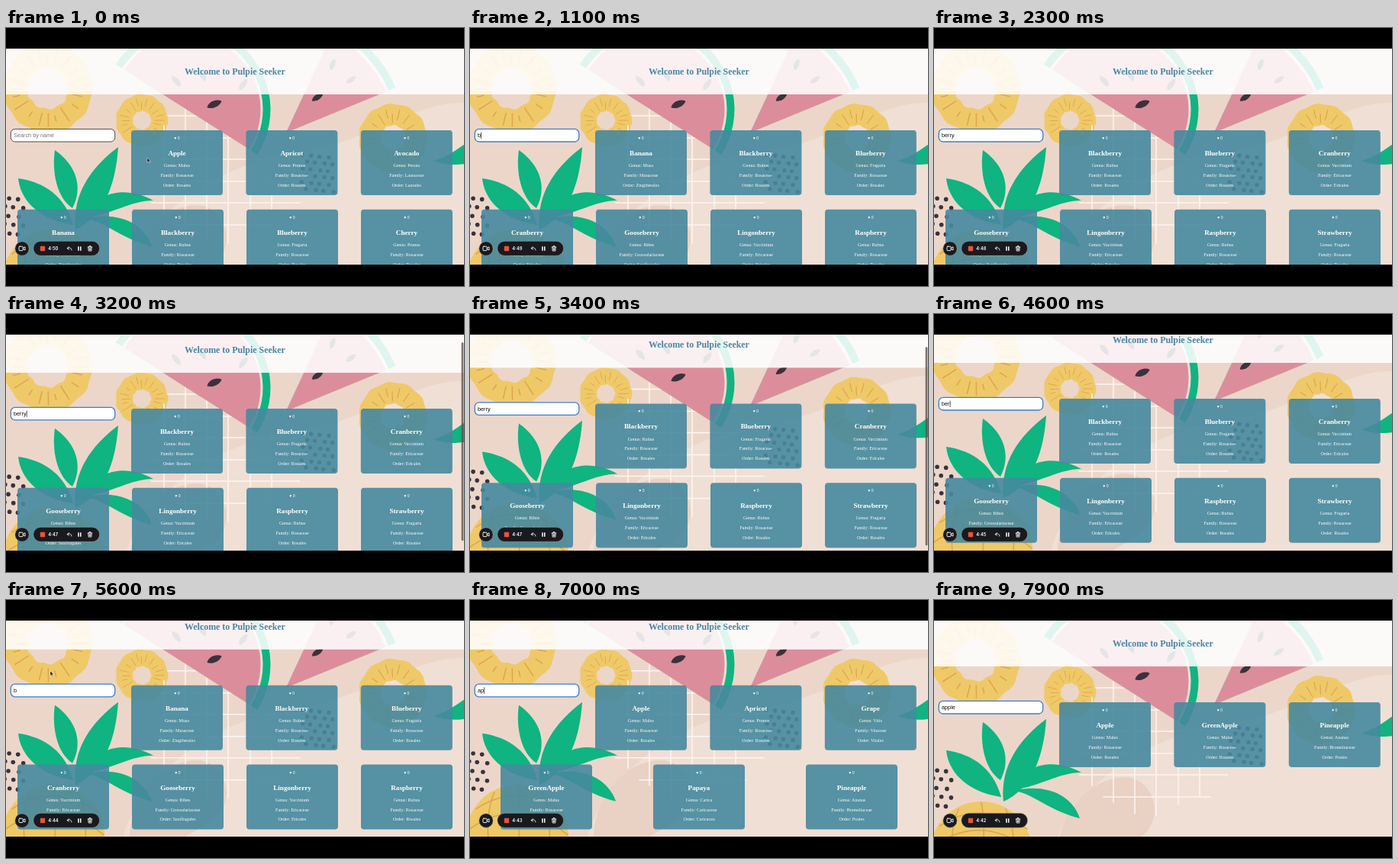
These frames come from a looping animation (600 px wide and 338 px high, 8000 ms). An HTML page:

```html
<!DOCTYPE html>
<html lang="en">
<head>
<meta charset="utf-8">
<title>Fruit search</title>
<style>
html, body { margin: 0; width: 100%; height: 100%; overflow: hidden; background: #000; }
svg { display: block; width: 600px; height: 338px; }
.serif { font-family: "Liberation Serif", "Times New Roman", serif; text-anchor: middle; }
.sans { font-family: "Liberation Sans", Arial, "DejaVu Sans", sans-serif; }
.title { font-size: 11.9px; font-weight: bold; fill: #4a86a0; }
.name { font-size: 9.1px; font-weight: bold; fill: #fff; }
.fact { font-size: 6.05px; fill: #fff; }
.likes { font-size: 5.2px; fill: #fff; text-anchor: middle; }
.input { font-size: 7.3px; }
.clock { font: 600 5.8px Inter, "Noto Sans", sans-serif; fill: #fff; }
</style>
</head>
<body>
<svg viewBox="0 0 600 338">
  <defs>
    <clipPath id="view"><rect y="27" width="600" height="283"/></clipPath>
  </defs>
  <g clip-path="url(#view)">
    <rect y="27" width="600" height="283" fill="#ecd6ca"/>
    <g id="page">
      <g id="art"></g>
      <rect y="27" width="600" height="60" fill="#fff" fill-opacity=".87"/>
      <text class="serif title" x="300" y="61">Welcome to Pulpie Seeker</text>
      <rect id="box" x="6.3" y="132.4" width="136.4" height="16.6" rx="5.5" fill="#fff"/>
      <text id="query" class="sans input" x="10" y="143.3"></text>
      <rect id="caret" y="136.5" width=".7" height="8.5" fill="#111"/>
      <g id="cards"></g>
    </g>
    <rect id="thumb" x="596.6" width="2.8" height="260" rx="1.4" fill="#5d514d" fill-opacity=".8"/>
    <g id="recorder">
      <g fill="#191a1e" stroke="#a9a39f" stroke-width=".5">
        <circle cx="21" cy="289" r="9.2"/>
        <rect x="35.8" y="279.3" width="86.8" height="19" rx="9.5"/>
      </g>
      <g fill="none" stroke="#fff" stroke-width=".9" stroke-linejoin="round" stroke-linecap="round">
        <rect x="17" y="286.2" width="5.2" height="5.4" rx="1"/>
        <path d="M22.3 288.3L25 286.8V291L22.3 289.6"/>
        <path d="M82.2 286.6L80.2 288.6L82.4 290.2M80.4 288.6C83 287 85.5 287.8 86 291"/>
        <path d="M107.2 287H112.8M109 286.8V285.6H111V286.8M107.8 287.4L108.2 292H111.8L112.2 287.4M109.3 288.6V290.6M110.7 288.6V290.6"/>
      </g>
      <rect x="44.8" y="285.8" width="6.4" height="6.4" rx="1" fill="#e5533d"/>
      <path d="M94.2 286.3h1.5v5.4h-1.5zM97 286.3h1.5v5.4H97z" fill="#fff"/>
      <text id="clock" class="clock" x="55.2" y="291.1"></text>
    </g>
    <path id="pointer" d="M0 0V6.2L1.5 4.9L2.5 7L3.5 6.5L2.5 4.5H4.4Z" fill="#111" stroke="#fff" stroke-width=".5"/>
  </g>
</svg>
<script>
const LOOP = 8000;
const $ = id => document.getElementById(id);
const GREEN = '#0fb481', PINK = '#dc8d9b', DARK = '#3a323b', YELLOW = '#efc968', ORANGE = '#dfa552';

// ---- background art ----
const path = (d, fill, extra = '') => `<path d="${d}" fill="${fill}" ${extra}/>`;
const stroke = (d, color, w) => path(d, 'none', `stroke="${color}" stroke-width="${w}" stroke-linecap="round"`);
const circle = (x, y, r, fill) => `<circle cx="${x}" cy="${y}" r="${r}" fill="${fill}"/>`;
const seed = (x, y, len, turn) =>
  path(`M${-len / 2} 0C${-len / 4} ${-len * .32} ${len / 4} ${-len * .28} ${len / 2} 0C${len / 4} ${len * .25} ${-len / 4} ${len * .25} ${-len / 2} 0Z`,
    DARK, `transform="translate(${x} ${y}) rotate(${turn})"`);

function loopPath(cx, cy, r, waves, depth) {
  let d = '';
  for (let i = 0; i < 72; i++) {
    const a = i * Math.PI / 36, q = r * (1 + depth * Math.cos(waves * a));
    d += `${i ? 'L' : 'M'}${(cx + q * Math.cos(a)).toFixed(1)} ${(cy + q * Math.sin(a)).toFixed(1)}`;
  }
  return d + 'Z';
}

function ring(cx, cy, r, hole) {
  let rays = '';
  for (let i = 0; i < 20; i++) {
    const a = i * Math.PI / 10 + .08 * Math.sin(i * 5);
    const from = hole + (r - hole) * (.24 + .12 * Math.sin(i * 3.7));
    const to = hole + (r - hole) * (.68 + .12 * Math.cos(i * 2.3));
    rays += `M${cx + from * Math.cos(a)} ${cy + from * Math.sin(a)}L${cx + to * Math.cos(a)} ${cy + to * Math.sin(a)}`;
  }
  return path(loopPath(cx, cy, r, 11, .018) + loopPath(cx, cy, hole, 9, .04), YELLOW, 'fill-rule="evenodd"')
    + stroke(rays, ORANGE, r / 36);
}

function dots(x, y, cols, rows, dx, dy, r) {
  let out = '';
  for (let j = 0; j < rows; j++)
    for (let i = 0; i < cols; i++)
      out += circle(x + i * dx + (j % 2) * dx / 2 + Math.sin(i * 3 + j), y + j * dy + i * 1.2, r, DARK);
  return out;
}

function grid() {
  const across = [[115, 212, 335], [144, 202, 350], [172, 198, 380], [201, 194, 385], [229, 190, 385], [258, 222, 362]];
  const down = [[207, 128, 243], [235, 98, 265], [263, 104, 280], [291, 110, 282], [320, 150, 268], [348, 165, 258]];
  return stroke(across.map(([y, a, b]) => `M${a} ${y}H${b}`).join('')
    + down.map(([x, a, b]) => `M${x} ${a}V${b}`).join(''), '#fdf6f1', 1.5);
}

// Half disc whose cut side faces the lower left
const halfDisc = (r, fill) => path(`M${-r} 0A${r} ${r} 0 0 1 ${r} 0Z`, fill, 'transform="translate(236.5 106.5) rotate(32.5)"');
// Wedge opening upwards from its tip
function wedge(r, fill) {
  const at = deg => `${r * Math.cos(deg * Math.PI / 180)} ${r * Math.sin(deg * Math.PI / 180)}`;
  return path(`M0 0L${at(-65)}A${r} ${r} 0 0 1 ${at(-22.3)}Z`, fill, 'transform="translate(367 137)"');
}

const leaves = [
  'M147 156C112 182 86 218 91 264C122 250 143 216 147 156Z',
  'M64 160C60 188 66 222 87 236C101 210 93 180 64 160Z',
  'M16 197C19 227 45 252 88 258C78 222 52 202 16 197Z',
  'M193 226C160 207 117 212 103 249C140 244 163 226 193 226Z',
  'M191 286C182 258 150 239 104 250C128 252 150 276 191 286Z',
  'M560 174C576 170 588 161 601 152V178C586 180 573 179 560 174Z'
];

$('art').innerHTML =
  path('M150 345C165 270 250 180 395 160C470 150 540 95 601 98V345Z', '#f0dfd5')
  + path('M162 345C158 285 200 232 252 232C284 234 300 275 280 302C262 322 230 330 220 345Z', '#e9d1c4')
  + ring(55, 79, 58, 27) + ring(178, 121, 34, 12) + ring(507, 144, 44.5, 16.5)
  + grid()
  + halfDisc(110, GREEN) + halfDisc(100, '#f3dcd6') + halfDisc(97, PINK)
  + wedge(155, GREEN) + wedge(145, '#f3dcd6') + wedge(141, PINK)
  + seed(273, 100, 21, -24) + seed(223, 70, 18, 50) + seed(257, 62, 18, 60) + seed(311, 74, 18, -55)
  + seed(408, 91, 17, -32) + seed(428, 48, 16, -70) + seed(452, 68, 16, -35)
  + dots(388, 166, 4, 6, 11.5, 9, 2.7) + dots(-8, 222, 3, 5, 12, 11.5, 2.8)
  + `<ellipse cx="62" cy="331" rx="67" ry="67" fill="${YELLOW}"/>`
  + stroke('M62 265C66 285 66 305 64 335M8 296C45 270 85 276 122 300M0 322C45 290 90 298 128 330M32 274C25 290 22 310 24 335M94 274C102 290 106 310 104 335', ORANGE, 1.6)
  + leaves.map(d => path(d, GREEN)).join('');

// ---- cards ----
const ROSE = 'Rosaceae Rosales', HEATH = 'Ericaceae Ericales';
const fruits = [
  `Apple Malus ${ROSE}`, `Apricot Prunus ${ROSE}`, 'Avocado Persea Lauraceae Laurales',
  'Banana Musa Musaceae Zingiberales', `Blackberry Rubus ${ROSE}`, `Blueberry Fragaria ${ROSE}`,
  `Cherry Prunus ${ROSE}`, `Cranberry Vaccinium ${HEATH}`, 'Dragonfruit Selenicereus Cactaceae Caryophyllales',
  'Gooseberry Ribes Grossulariaceae Saxifragales', 'Grape Vitis Vitaceae Vitales', `GreenApple Malus ${ROSE}`,
  `Lingonberry Vaccinium ${HEATH}`, 'Papaya Carica Caricaceae Caricacea', 'Pineapple Ananas Bromeliaceae Poales',
  `Raspberry Rubus ${ROSE}`, `Strawberry Fragaria ${ROSE}`
].map(line => line.split(' '));

function card([name, genus, family, order], x, y) {
  const facts = [`Genus: ${genus}`, `Family: ${family}`, `Order: ${order}`];
  return `<g transform="translate(${x} ${y})">
    <rect width="120" height="85" rx="4" fill="#46899f" fill-opacity=".9"/>
    <text class="sans likes" x="60" y="12">♥ 0</text>
    <text class="serif name" x="60" y="33">${name}</text>
    ${facts.map((f, i) => `<text class="serif fact" x="60" y="${48.2 + i * 12.8}">${f}</text>`).join('')}
  </g>`;
}

function layCards(query) {
  const hits = fruits.filter(f => f[0].toLowerCase().includes(query));
  const second = hits.slice(3, 7);
  $('cards').innerHTML =
    hits.slice(0, 3).map((f, i) => card(f, 164 + i * 150.4, 134)).join('')
    + second.map((f, i) => card(f, 600 / second.length * (i + .5) - 60, 237.8)).join('');
}

// ---- timeline ----
const FOCUS = 900;
const edits = [
  [0, ''], [1100, 'b'], [1300, 'be'], [1450, 'ber'], [1600, 'berr'], [1750, 'berry'],
  [4400, 'berr'], [4600, 'ber'], [4800, 'be'], [5000, 'b'], [5750, ''],
  [6500, 'a'], [6800, 'ap'], [7150, 'app'], [7250, 'appl'], [7350, 'apple']
];
const scrolls = [[0, 0], [2800, 0], [3000, 3], [3200, 10], [3400, 16.6], [3600, 21], [3800, 23], [4600, 23], [4800, 22.2], [7149, 22.2], [7150, 0]];
const moves = [[0, 185, 170], [300, 176, 166], [800, 90, 141], [1099, 84, 141]];
const returns = [[5000, 66, 117], [5400, 58, 93], [5800, 58, 93], [6300, 62, 99]];

function tween(keys, t, col = 1) {
  const i = keys.findIndex(k => k[0] > t);
  if (i < 0) return keys[keys.length - 1][col];
  if (i === 0) return keys[0][col];
  const a = keys[i - 1], b = keys[i];
  return a[col] + (b[col] - a[col]) * (t - a[0]) / (b[0] - a[0]);
}

const show = (el, on) => el.setAttribute('visibility', on ? 'visible' : 'hidden');
let shown = null;

function draw(t) {
  const [since, query] = edits.filter(e => e[0] <= t).pop();
  const focused = t >= FOCUS;
  const label = $('query');
  if (query !== shown) {
    shown = query;
    layCards(query);
    label.textContent = query || 'Search by name';
    label.setAttribute('fill', query ? '#111' : '#757575');
  }
  $('box').setAttribute('stroke', focused ? '#3f7fc4' : '#4c4c4c');
  $('box').setAttribute('stroke-width', focused ? 1.3 : 1);

  const caret = $('caret');
  caret.setAttribute('x', 10.2 + (query ? label.getComputedTextLength() : 0));
  show(caret, focused && (t - Math.max(since, FOCUS)) % 1000 < 500);

  const scroll = tween(scrolls, t);
  $('page').setAttribute('transform', `translate(0 ${-scroll})`);
  $('thumb').setAttribute('y', 28 + scroll * .92);
  show($('thumb'), t >= 2850 && t < 4600);

  const track = t < 1100 ? moves : returns;
  $('pointer').setAttribute('transform', `translate(${tween(track, t, 1)} ${tween(track, t, 2)})`);
  show($('pointer'), t < 1100 || (t >= 5000 && t < 6500));

  const left = 50 - Math.floor((t + 500) / 1000);
  $('clock').textContent = `4:${left}`;
}

const start = performance.now();
function tick() {
  draw((performance.now() - start) % LOOP);
  requestAnimationFrame(tick);
}
tick();
</script>
</body>
</html>
```
